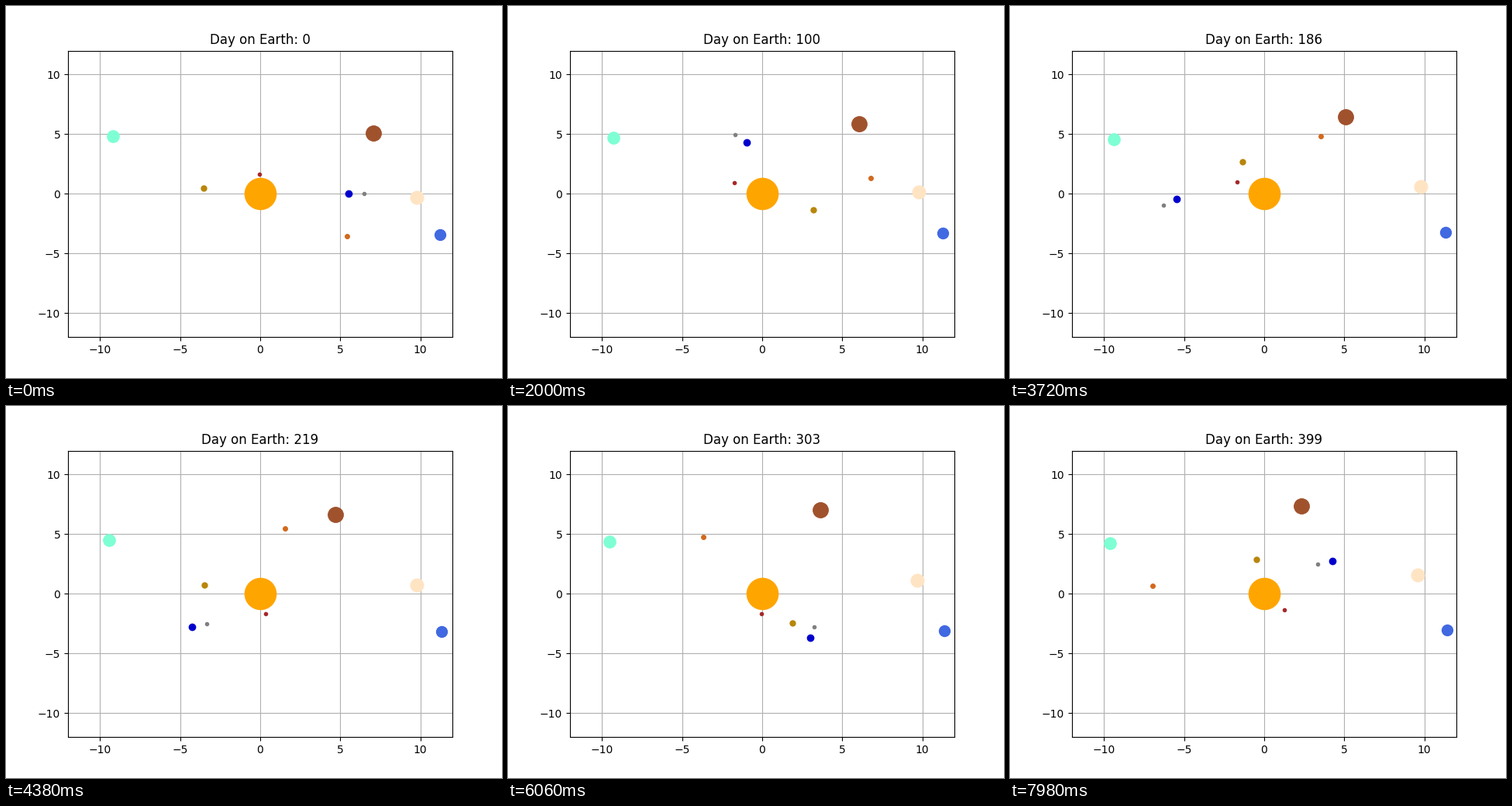
A matplotlib script for the animation above (8000 ms loop, 640 px wide and 480 px high).

```python
import numpy as np
import matplotlib.pyplot as plt
from matplotlib.animation import FuncAnimation

DAYS = 400
FLATTEN = 0.8       # minor axis / major axis of every orbit
MOON_ORBIT = 0.965
MOON_SPEED = 5      # degrees per day

# colour, marker size, semi-major axis, period in days, start angle in degrees
PLANETS = {
    "Mercury": ("brown", 3, 2.1, 88, 91.45),
    "Venus": ("darkgoldenrod", 5, 3.6, 225, 170.2),
    "Earth": ("mediumblue", 6, 5.5, 365, 0),
    "Mars": ("chocolate", 4, 7.0, 687, -39.2),
    "Jupiter": ("sienna", 14, 9.5, 4333, 42.1),
    "Saturn": ("bisque", 12, 9.8, 10759, -2.05),
    "Uranus": ("aquamarine", 11, 11.0, 30687, 146.5),
    "Neptune": ("royalblue", 10, 12.0, 60190, -20.65),
}

fig, ax = plt.subplots(figsize=(6.4, 4.8), dpi=100)
ax.set_xlim(-12, 12)
ax.set_ylim(-12, 12)
ax.grid(True)
title = ax.set_title("Day on Earth: 0")


def body(color, size):
    return ax.plot([0], [0], "o", color=color, markersize=size)[0]


def orbit(name, day):
    _, _, major, period, start = PLANETS[name]
    angle = np.radians(start + day * 365 / period)
    return major * np.cos(angle), FLATTEN * major * np.sin(angle)


sun = body("orange", 29)
dots = {name: body(spec[0], spec[1]) for name, spec in PLANETS.items()}
moon = body("gray", 3)


def update(day):
    for name, dot in dots.items():
        x, y = orbit(name, day)
        dot.set_data([x], [y])
    x, y = orbit("Earth", day)
    angle = np.radians(MOON_SPEED * day)
    moon.set_data([x + MOON_ORBIT * np.cos(angle)],
                  [y + MOON_ORBIT * np.sin(angle)])
    title.set_text(f"Day on Earth: {day}")
    return [*dots.values(), moon, title]


anim = FuncAnimation(fig, update, frames=DAYS, interval=20,
                     repeat=True, repeat_delay=0)
plt.show()
```
